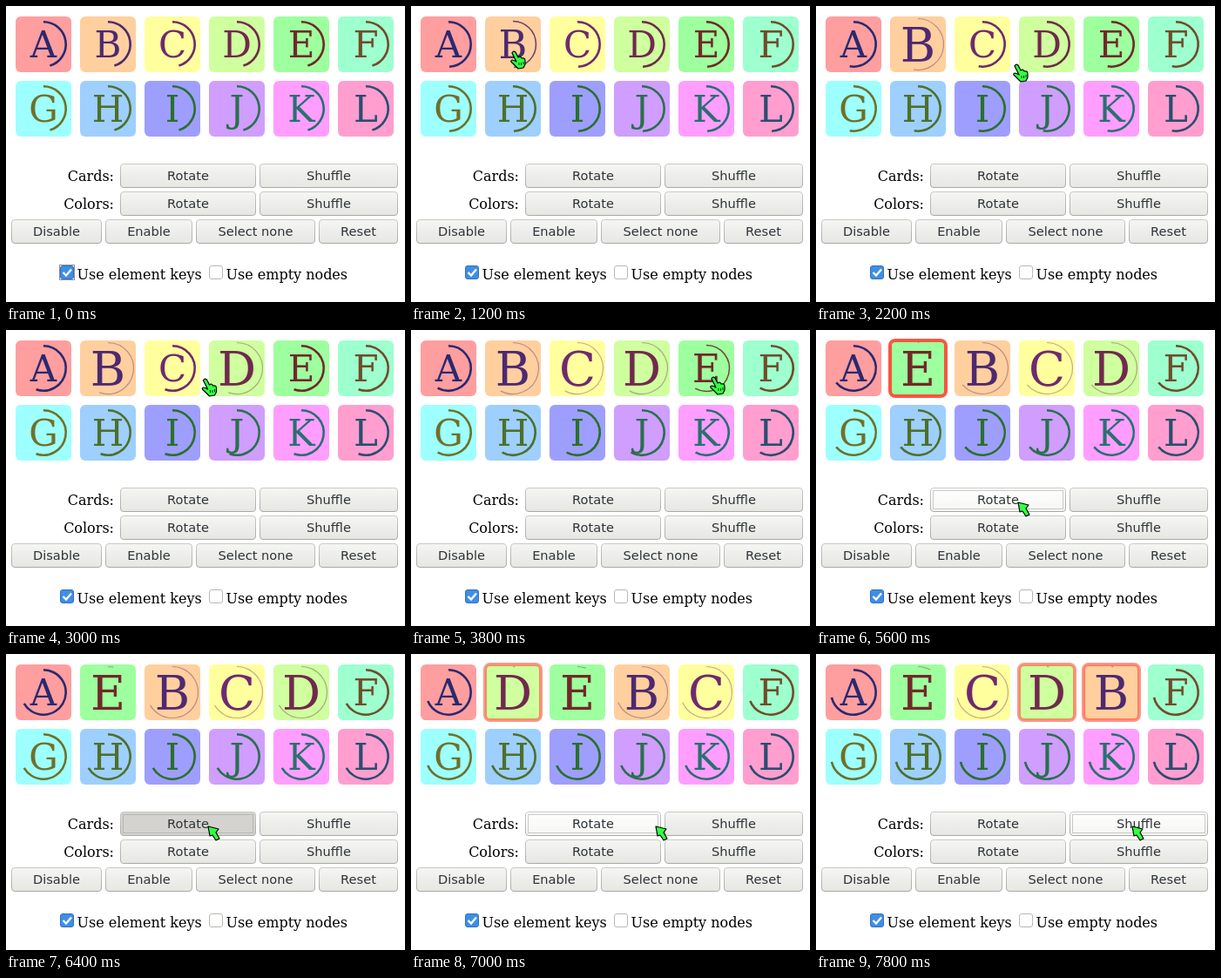
Recreate the animation shown at these times as an HTML page. Size 458x340 px, loop 8000 ms.

```html
<!DOCTYPE html>
<html lang="en">
<head>
<meta charset="utf-8">
<title>Cards</title>
<style>
  html, body { margin: 0; width: 100%; height: 100%; overflow: hidden; background: #fff; }
  svg { display: block; width: 458px; height: 340px; }
  text { font-family: "DejaVu Serif", "Noto Serif", serif; font-size: 16px; }
  .button text { font-family: "DejaVu Sans", sans-serif; font-size: 14.6px; fill: #2e3436; text-anchor: middle; }
  .card text { text-anchor: middle; }
  .dots { fill: none; stroke: #999; stroke-dasharray: 1 1; }
</style>
</head>
<body>
<svg id="stage" viewBox="0 0 458 340">
  <defs>
    <linearGradient id="normal" x2="0" y2="1"><stop stop-color="#f5f5f3"/><stop offset="1" stop-color="#e6e6e3"/></linearGradient>
    <linearGradient id="hover" x2="0" y2="1"><stop stop-color="#fff"/><stop offset="1" stop-color="#f5f5f3"/></linearGradient>
    <linearGradient id="edge" x2="0" y2="1"><stop stop-color="#c9c9c5"/><stop offset="1" stop-color="#a9a9a5"/></linearGradient>
  </defs>
</svg>
<script>
const LOOP = 8000, STEP = 200;
const stage = document.getElementById('stage');

function add(parent, tag, attrs = {}, label) {
  const node = document.createElementNS('http://www.w3.org/2000/svg', tag);
  set(node, attrs);
  if (label) node.textContent = label;
  return parent.appendChild(node);
}
function set(node, attrs) {
  for (const key in attrs) node.setAttribute(key, attrs[key]);
}
const show = (node, on) => set(node, { visibility: on ? 'visible' : 'hidden' });
const clamp = v => Math.max(0, Math.min(1, v));
const mix = (a, b, k) => a + (b - a) * k;

// Card order in the first row, and when each order takes effect
const orders = [[0, 'ABCDEF'], [5400, 'AEBCDF'], [6600, 'ADEBCF'], [7400, 'AECDBF']];
const selectedAt = { B: 1200, D: 2600, C: 3200, E: 3800 };
const inserted = { E: [5400], D: [6600, 7400], B: [7400] };
const FIRST_BIRTH = -13600, DEG_PER_MS = 0.012;

const cards = [...'ABCDEFGHIJKL'].map((letter, i) => {
  const g = add(stage, 'g', { class: 'card' });
  const ink = `hsl(${240 + 30 * i},47%,30%)`;
  add(g, 'rect', { x: -32, y: -32, width: 64, height: 64, rx: 6, fill: `hsl(${30 * i},100%,81%)` });
  return {
    letter, i, g,
    ring: add(g, 'rect', { x: -32, y: -32, width: 64, height: 64, rx: 6, fill: 'none', stroke: '#ff4030', 'stroke-width': 4 }),
    text: add(g, 'text', { fill: ink }, letter),
    arc: add(g, 'path', { fill: 'none', stroke: ink })
  };
});

function arcPath(r, deg) {
  const a = deg * Math.PI / 180;
  return `M0 ${-r}A${r} ${r} 0 ${deg > 180 ? 1 : 0} 1 ${r * Math.sin(a)} ${-r * Math.cos(a)}`;
}

function drawCard(card, t, order) {
  const { letter, i } = card;
  const slot = i < 6 ? order.indexOf(letter) : i - 6;
  set(card.g, { transform: `translate(${43 + 74 * slot} ${i < 6 ? 44 : 118})` });

  const k = letter in selectedAt ? clamp((t - selectedAt[letter] + 50) / 250) : 0;
  const size = mix(42, 55, k);
  card.text.style.fontSize = size + 'px';
  set(card.text, { y: size * 0.365 });

  const births = (inserted[letter] || []).filter(b => b <= t);
  const age = t - (births.length ? births.pop() : FIRST_BIRTH);
  set(card.arc, {
    d: arcPath(mix(25.7, 29.5, k), age * DEG_PER_MS),
    'stroke-width': mix(2.6, 1.2, clamp(4 * k)),
    opacity: mix(1, 0.4, k)
  });
  set(card.ring, { opacity: clamp(1 - (age / 600) ** 2) });
}

// Labels and buttons
add(stage, 'text', { x: 124, y: 201, 'text-anchor': 'end' }, 'Cards:');
add(stage, 'text', { x: 124, y: 233, 'text-anchor': 'end' }, 'Colors:');

const buttons = [
  ['Rotate', 131, 181, 156], ['Shuffle', 291, 181, 159],
  ['Rotate', 131, 213, 156], ['Shuffle', 291, 213, 159],
  ['Disable', 6, 245, 104], ['Enable', 114, 245, 100],
  ['Select none', 218, 245, 137], ['Reset', 359, 245, 91]
].map(([label, x, y, w]) => {
  const g = add(stage, 'g', { class: 'button', transform: `translate(${x} ${y})` });
  const face = add(g, 'rect', { x: 0.5, y: 0.5, width: w - 1, height: 27, rx: 3.5, stroke: 'url(#edge)' });
  const focus = add(g, 'rect', { class: 'dots', x: 3.5, y: 3.5, width: w - 7, height: 21 });
  add(g, 'text', { x: w / 2, y: 19 }, label);
  return { x, y, w, face, focus };
});
const presses = [[0, 5000, 5400], [0, 6400, 6600], [1, 7200, 7400]];

// Checkboxes
add(stage, 'rect', { x: 62.5, y: 298.5, width: 15, height: 15, rx: 2.5, fill: '#3f8ee6', stroke: '#2d72c4' });
add(stage, 'path', { d: 'M65.5 306L69 309.5L75 302.5', fill: 'none', stroke: '#fff', 'stroke-width': 2.4 });
const checkFocus = add(stage, 'rect', { class: 'dots', x: 61.5, y: 297.5, width: 17, height: 17, style: 'stroke:#222' });
add(stage, 'text', { x: 81.5, y: 314 }, 'Use element keys');
add(stage, 'rect', { x: 233.5, y: 298.5, width: 15, height: 15, rx: 2.5, fill: '#fff', stroke: '#b8b8b4' });
add(stage, 'text', { x: 252.5, y: 314 }, 'Use empty nodes');

// Pointer
const pointer = add(stage, 'g', { fill: '#3f4', stroke: '#000', 'stroke-width': 1.2, 'stroke-linejoin': 'round' });
const hand = add(pointer, 'g');
add(hand, 'path', { d: 'M-1 2Q0-1 3 1L6 7Q9 5 10 8Q14 7 14 11L14 15L12 19L6 20L0 14Q-4 11-1 10Q1 10 4 12Z' });
add(hand, 'path', { d: 'M7 13V16M9.5 13V16M12 12V15', 'stroke-width': 0.8 });
const arrow = add(pointer, 'path', { d: 'M0 0L12 3L9 7L13 14L9 16L5 10L2 11Z' });
const path = [
  [400, 105, 240], [1000, 117, 52], [1600, 117, 52], [2200, 229, 67], [2400, 262, 56],
  [2800, 262, 56], [3200, 193, 56], [3400, 193, 56], [3800, 346, 54], [4200, 346, 54],
  [4800, 232, 198], [6600, 232, 198], [7000, 281, 198], [7200, 363, 198], [8000, 363, 198]
];

function pointerAt(t) {
  const n = path.findIndex(p => p[0] > t);
  if (n < 1) return path[0].slice(1);
  const [a, b] = [path[n - 1], path[n]];
  const k = (t - a[0]) / (b[0] - a[0]);
  return [mix(a[1], b[1], k), mix(a[2], b[2], k)];
}

function draw(time) {
  const t = Math.floor((time % LOOP) / STEP) * STEP;
  const order = orders.filter(o => o[0] <= t).pop()[1];
  cards.forEach(card => drawCard(card, t, order));

  const [x, y] = pointerAt(t);
  show(pointer, t >= 400);
  set(pointer, { transform: `translate(${x} ${y})` });
  const overCards = y < 152;
  set(hand, { display: overCards ? 'inline' : 'none' });
  set(arrow, { display: overCards ? 'none' : 'inline' });

  const last = presses.filter(p => p[1] <= t).pop();
  buttons.forEach((b, i) => {
    const focused = !!last && last[0] === i;
    const over = t >= 400 && x >= b.x && x < b.x + b.w && y >= b.y && y < b.y + 28;
    const pressed = focused && t < last[2];
    set(b.face, { fill: pressed ? '#d5d3cf' : over ? 'url(#hover)' : 'url(#normal)' });
    show(b.focus, focused);
  });
  show(checkFocus, t < 1200);
}

const start = performance.now();
function tick() {
  draw(performance.now() - start);
  requestAnimationFrame(tick);
}
tick();
</script>
</body>
</html>
```
